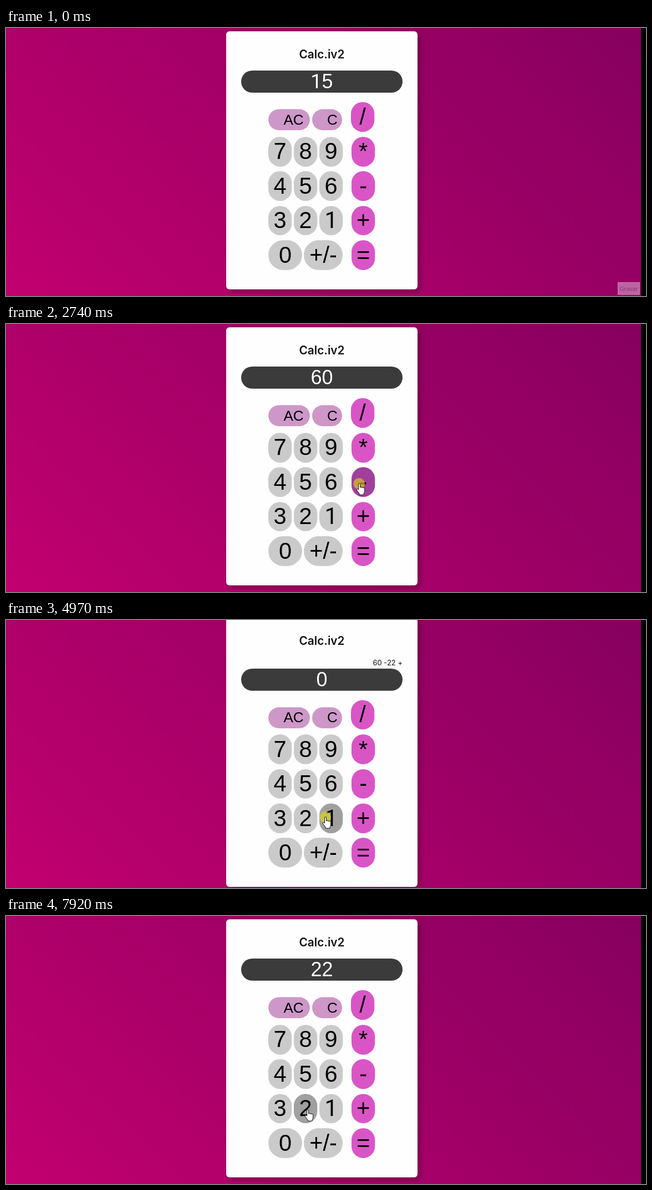
Write an HTML page that moves like this. It is 1154x485 px and loops after 7.99 s.

```html
<!DOCTYPE html>
<html lang="pt">
<head>
<meta charset="utf-8">
<title>Calc.iv2</title>
<style>
  html, body { margin: 0; width: 100%; height: 100%; overflow: hidden; background: #000; }
  .bg { position: absolute; left: 0; top: 0; width: 1145px; height: 485px;
        background: linear-gradient(45deg, #c1006e, #86005f); }
  .card { position: absolute; left: 397px; width: 345px; border-radius: 6px;
          background: #fefefe; box-shadow: 5px 5px 10px rgba(0, 0, 0, .25); }
  svg { position: absolute; left: 0; top: 0; }
  text { font-family: "Liberation Sans", Arial, sans-serif; text-anchor: middle; }
  .one { font-family: Roboto, sans-serif; }
  .ui { font-family: Inter, sans-serif; fill: #111; }
</style>
</head>
<body>
<div class="bg"></div>
<div class="card" id="card"></div>
<svg width="1154" height="485" viewBox="0 0 1154 485">
  <text id="title" class="ui" x="569.5" font-size="20.8" font-weight="600">Calc.iv2</text>
  <text id="expr" class="ui" x="715" y="81.5" font-size="13" style="text-anchor:end"></text>
  <g id="pad"></g>
  <g id="save">
    <rect x="1103.5" y="460.5" width="39" height="22" fill="#bd63a3" stroke="#c77bb0"/>
    <text x="1123" y="475.5" font-size="10.5" fill="#84346f" style="font-family:'Open Sans',sans-serif">Gravar</text>
  </g>
  <g id="cursor">
    <circle id="dot" r="10.3" cx="-.5" fill="rgba(225,220,10,.6)"/>
    <path id="hand" fill="#fff" stroke="#111" stroke-linejoin="round"
      d="M-1.5 1a1.5 1.5 0 0 1 3 0V7a1.4 1.4 0 0 1 2.8 .4a1.4 1.4 0 0 1 2.7 .6a1.3 1.3 0 0 1 2.5 .6V13q0 3-1.5 4.5V20H0V18L-4.5 12a1.5 1.5 0 0 1 2.3-2l.7 .8Z"/>
    <path id="arrow" fill="#fff" stroke="#111" d="M0 0V16l3.7-3.5L6 18l2.4-1L6 11.6h5Z"/>
  </g>
</svg>
<script>
const LOOP = 7990, SHIFT = 10.4;
const BEGIN = 70, TRAVEL = 370, HOLD = 100, REST = 70, FADE = 150;
const GREY = [[202, 202, 202], [160, 160, 160]];
const PINK = [[217, 85, 198], [160, 64, 154]];
const SOFT = [[205, 151, 200], [165, 110, 160]];

const $ = id => document.getElementById(id);
const show = (el, on) => { el.style.display = on ? '' : 'none'; };

// the footless 1 comes from a second font
const write = (el, s) => { el.innerHTML = s.replace(/1/g, '<tspan class="one">1</tspan>'); };

// everything on the pad moves together and snaps to whole pixels
const parts = [], keys = [];

function add(tag, attrs, y, h) {
  const el = document.createElementNS('http://www.w3.org/2000/svg', tag);
  for (const k in attrs) el.setAttribute(k, attrs[k]);
  parts.push({ el, y, h });
  return $('pad').appendChild(el);
}

function place(dy) {
  for (const { el, y, h } of parts) {
    const top = Math.round(y + dy);
    el.setAttribute('y', top);
    if (h) el.setAttribute('height', Math.round(y + h + dy) - top);
  }
}

function key(label, x, y, w, h, tone, size = 41.6, tx = x + w / 2) {
  const rect = add('rect', { x, width: w, rx: Math.min(w, h) / 2 }, y, h);
  write(add('text', { x: tx, 'font-size': size }, y + h / 2 + size * .33), label);
  keys.push({ label, x, y, w, h, tone, rect });
}

const row = r => 196.8 + 62.4 * r;
const W = 42.3, H = 53.8;
add('rect', { x: 424, width: 291, rx: 20, fill: '#3b3b3b' }, 77.2, 40);
const out = add('text', { x: 569.5, 'font-size': 36, fill: '#fff' }, 109.2);
key('AC', 473, 147.2, 75, 38, SOFT, 26, 518.5);
key('C', 552, 147.2, 54, 38, SOFT, 26, 588.5);
key('/', 622, 134.2, W, H, PINK);
['789', '456', '321'].forEach((line, r) =>
  [...line].forEach((d, c) => key(d, 473 + 46 * c, row(r), W, H, GREY)));
key('0', 473, row(3), 61, H, GREY);
key('+/-', 537, row(3), 70, H, GREY);
[...'*-+='].forEach((op, r) => key(op, 623, row(r), W, H, PINK));

// key, pointer offset from its middle, click times
const visits = [
  ['6', 0, 4, [680]],
  ['5', 7, 10, [], 1580],
  ['0', 1, 1, [1970]],
  ['-', -7, 3, [2665]],
  ['2', 9, -1, [3340, 3480]],
  ['+', -4, 0, [4080]],
  ['1', -10, -2, [4900, 5130]],
  ['=', -1, -8, [6285]],
  ['2', 4, 2.5, [7710, 7815]]
];

function press({ shown, expr, fresh }, k) {
  if (/\d/.test(k)) return { shown: fresh ? k : shown + k, expr, fresh: false };
  if (k !== '=') return { shown: '0', expr: `${expr}${shown} ${k}`, fresh: true };
  const terms = (expr + shown).replace(/ /g, '').match(/[+-]?\d+/g);
  return { shown: String(terms.reduce((sum, n) => sum + +n, 0)), expr: '', fresh: true };
}

const states = [{ t: -Infinity, shown: '15', expr: '', fresh: true }];
const stops = [{ x: 1120, y: 470, leave: BEGIN }];
const clicks = visits.flatMap(v => v[3]);
const lift = s => s.expr ? SHIFT : 0;

for (const [label, dx, dy, times, until] of visits) {
  const k = keys.find(k => k.label === label);
  const y = k.y + k.h / 2 + dy + lift(states[states.length - 1]);
  for (const t of times)
    states.push({ t: t + HOLD, ...press(states[states.length - 1], label) });
  stops.push({ x: k.x + k.w / 2 + dx, y, leave: until || Math.max(...times) + HOLD + REST });
}

const stateAt = t => states.filter(s => s.t <= t).pop();

function tip(t) {
  const i = stops.filter(s => s.leave <= t).length;
  if (!i || i === stops.length) return stops[Math.max(0, i - 1)];
  const a = stops[i - 1], b = stops[i];
  const u = Math.min(1, (t - a.leave) / TRAVEL), e = u * u * (3 - 2 * u);
  return { x: a.x + (b.x - a.x) * e, y: a.y + (b.y - a.y) * e };
}

function over(t) {
  const { x, y } = tip(t), dy = lift(stateAt(t));
  return keys.find(k => x >= k.x && x <= k.x + k.w && y >= k.y + dy && y <= k.y + k.h + dy);
}

// a key darkens over FADE ms and clears at once
function shade(hot, t) {
  const steps = 20;
  let n = 0;
  while (n < steps && over(t - n * FADE / steps) === hot) n++;
  return n / steps;
}

function draw(t) {
  const state = stateAt(t), dy = lift(state);
  const top = Math.round(6 - dy);
  $('card').style.top = top + 'px';
  $('card').style.height = Math.round(473 + dy) - top + 'px';
  $('title').setAttribute('y', Math.round(55 - dy));
  $('expr').textContent = state.expr;
  write(out, state.shown);
  place(dy);

  const hot = over(t), level = hot ? shade(hot, t) : 0;
  for (const k of keys) {
    const f = k === hot ? level : 0;
    const rgb = k.tone[0].map((c, i) => Math.round(c + (k.tone[1][i] - c) * f));
    k.rect.setAttribute('fill', `rgb(${rgb})`);
  }

  const { x, y } = tip(t);
  $('cursor').setAttribute('transform', `translate(${x} ${y})`);
  show($('save'), t < BEGIN);
  show($('cursor'), t >= BEGIN);
  show($('hand'), hot);
  show($('arrow'), !hot);
  show($('dot'), clicks.some(c => t >= c && t < c + HOLD));
}

const start = performance.now();
function frame() {
  draw((performance.now() - start) % LOOP);
  requestAnimationFrame(frame);
}
frame();
</script>
</body>
</html>
```
